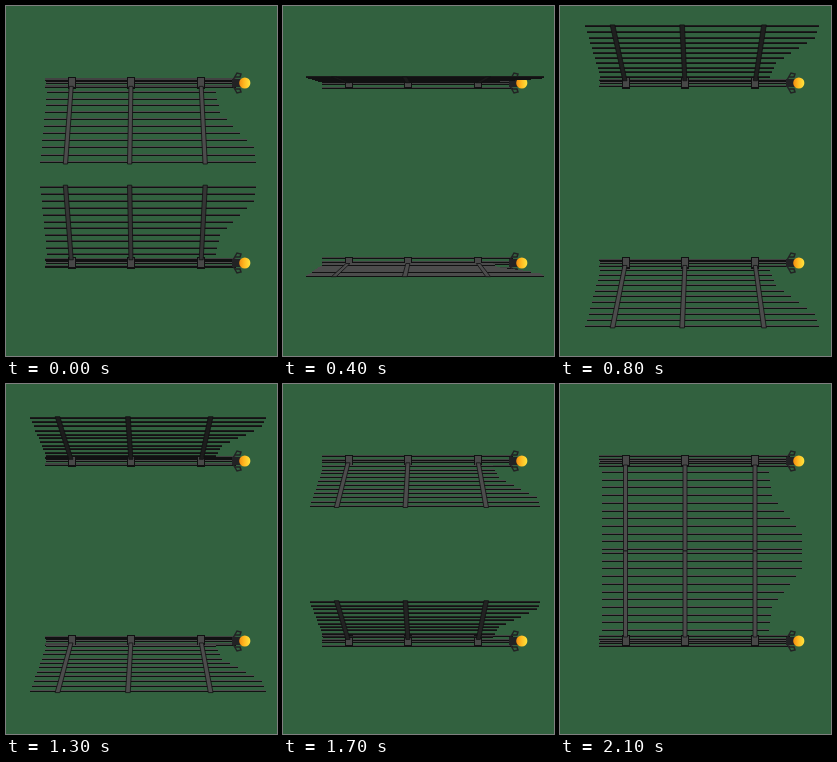
These frames come from a looping animation (271 by 350 pixels, 2600 ms). An HTML page with a canvas:

```html
<!DOCTYPE html>
<html lang="en">
<head>
<meta charset="utf-8">
<title>Double gate</title>
<style>
  html, body { margin: 0; width: 100%; height: 100%; overflow: hidden; background: #32613f; }
  canvas { display: block; }
</style>
</head>
<body>
<canvas id="stage" width="271" height="350"></canvas>
<script>
const ctx = document.getElementById('stage').getContext('2d');
const EYE = { x: 142, y: 147 };
const DEPTH = 556;
const LENGTH = 90;
const LEFT = 42;
const DARK = '#111112';
const STRAPS = [65.5, 125, 195];
const BAR_ENDS = [209, 210, 211, 212, 218, 224, 230, 236, 242, 242, 242];
const HINGES = [{ y: 77, dir: 1 }, { y: 257, dir: -1 }];

// [end time in ms, opening angle in degrees]
const POSES = [
  [250, 27], [400, 56.5], [550, 86], [800, 107.2], [1300, 116],
  [1550, 107.2], [1700, 86], [1850, 56.5], [2100, 27], [2600, 0]
];
const PERIOD = 2600;

const gray = level => `rgb(${level}, ${level}, ${level})`;

// Point on a leaf, at a given distance from its hinge, in perspective
function project(hinge, angle, x, dist) {
  const scale = 1 / (1 - dist * Math.sin(angle) / DEPTH);
  const y = hinge.y + hinge.dir * dist * Math.cos(angle);
  return { x: EYE.x + (x - EYE.x) * scale, y: EYE.y + (y - EYE.y) * scale };
}

// The visible face is dark when it points down
function faceLevel(hinge, angle) {
  const end = project(hinge, angle, LEFT, LENGTH);
  return end.y > hinge.y ? 76 : 76 - 50 * Math.sin(angle);
}

function box(x1, y1, x2, y2, color) {
  ctx.fillStyle = color;
  ctx.fillRect(x1, y1, x2 - x1, y2 - y1);
}

// Thin bar on whole pixels: lit upper row, dark lower row
function bar(x1, x2, y, level) {
  const left = Math.round(x1), right = Math.round(x2), row = Math.round(y);
  box(left, row - 1, right, row, gray(level));
  box(left, row, right, row + 1, DARK);
}

function drawPost({ y, dir }, angle) {
  box(40, y - 2, 228, y + 1, DARK);
  box(40, y - 1, 228, y, gray(76));
  // Four rods turning around the hinge axis
  for (let i = 0; i < 4; i++) {
    const turn = angle + Math.PI / 9 + i * Math.PI / 2;
    bar(39, 230, y + dir * 4.8 * Math.cos(turn), 66);
  }
  for (const x of STRAPS.map(Math.round)) {
    box(x - 4, y - 6, x + 4, y + 6, DARK);
    box(x - 3, y - 5, x + 3, y + 4, gray(72));
  }
}

function drawKnob(y) {
  ctx.strokeStyle = '#222224';
  ctx.lineWidth = 1.5;
  for (const side of [-1, 1]) {
    ctx.beginPath();
    ctx.moveTo(227, y + side * 3);
    ctx.lineTo(231, y + side * 10);
    ctx.lineTo(235, y + side * 9);
    ctx.lineTo(234, y + side * 6);
    ctx.lineTo(229, y + side * 6);
    ctx.stroke();
  }
  box(226, y - 4, 235, y + 4, '#222224');
  const glow = ctx.createLinearGradient(233, 0, 244, 0);
  glow.addColorStop(0, '#f08a10');
  glow.addColorStop(0.45, '#ffb820');
  glow.addColorStop(1, '#ffe23c');
  ctx.fillStyle = glow;
  ctx.beginPath();
  ctx.arc(238.8, y, 5.6, 0, 7);
  ctx.fill();
}

function drawLeaf(hinge, angle) {
  const level = faceLevel(hinge, angle);
  BAR_ENDS.forEach((end, i) => {
    const dist = 11 + i * 7.7;
    const a = project(hinge, angle, LEFT, dist);
    const b = project(hinge, angle, end, dist);
    bar(a.x, b.x, a.y, level);
  });
  for (const x of STRAPS) {
    const corners = [[-2, 4], [2, 4], [2, LENGTH], [-2, LENGTH]]
      .map(([dx, dist]) => project(hinge, angle, x + dx, dist));
    ctx.beginPath();
    corners.forEach(p => ctx.lineTo(p.x, p.y));
    ctx.closePath();
    ctx.fillStyle = gray(level);
    ctx.fill();
    ctx.strokeStyle = DARK;
    ctx.lineWidth = 0.8;
    ctx.stroke();
  }
}

function draw(now) {
  const time = now % PERIOD;
  const angle = POSES.find(([end]) => time < end)[1] * Math.PI / 180;
  box(0, 0, 271, 350, '#32613f');
  for (const hinge of HINGES) {
    drawPost(hinge, angle);
    drawKnob(hinge.y);
    drawLeaf(hinge, angle);
  }
  requestAnimationFrame(() => draw(performance.now()));
}
draw(0);
</script>
</body>
</html>
```
